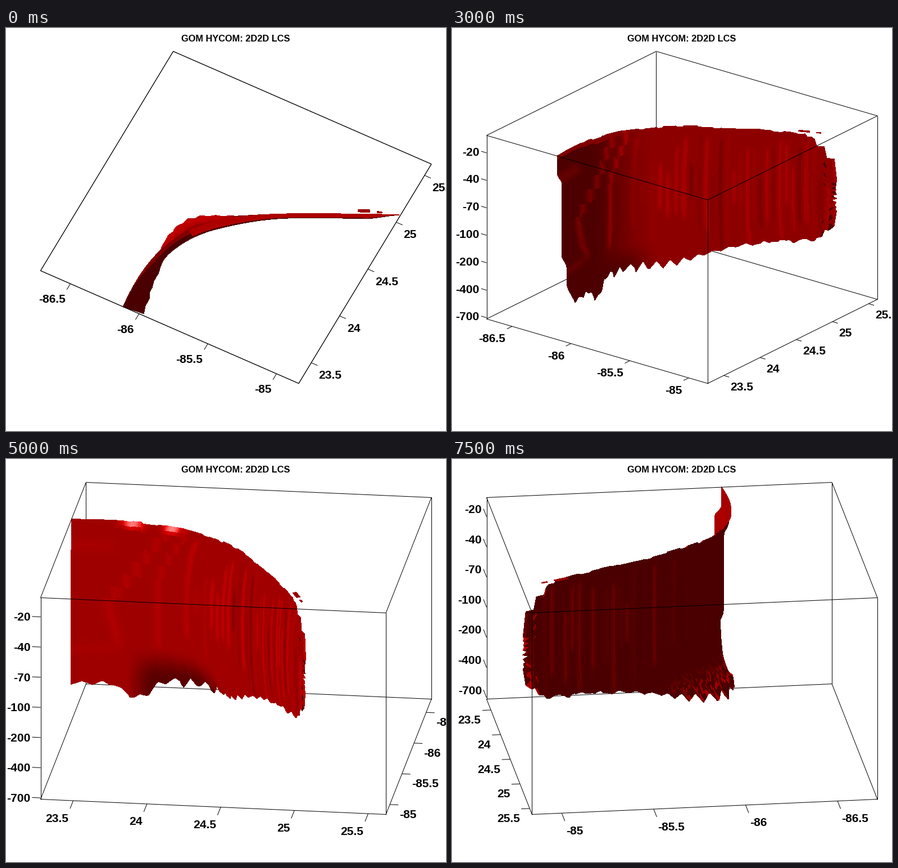
Recreate the animation shown at these times as a matplotlib script. Size 783x716 px, loop 8 s.

```python
import numpy as np
import matplotlib.pyplot as plt
from matplotlib.animation import FuncAnimation
from matplotlib.collections import LineCollection, PolyCollection

W, H, DPI = 783, 716, 64
PX = 72 / DPI                      # one pixel in points
LEFT, RIGHT, TOP, BOTTOM = 61.5, 757, 41.5, 631.5
plt.rcParams["font.family"] = "Liberation Sans"

X_TICKS = [(.1154 + .2662 * k, f"{-86.5 + k / 2:g}") for k in range(4)]
Y_TICKS = [(.0945 + .2135 * k, f"{23.5 + k / 2:g}") for k in range(5)]
Z_TICKS = [(.905 - .1497 * k, f"{-d}") for k, d in enumerate([20, 40, 70, 100, 200, 400, 700])]

CUBE = np.array([(i, j, k) for i in (0, 1) for j in (0, 1) for k in (0, 1)], float)
EDGES = [(i, j) for i in range(8) for j in range(i + 1, 8)
         if np.abs(CUBE[i] - CUBE[j]).sum() == 1]


def camera(i):
    """Tilt down to 30 degrees first, then orbit in 15 degree steps."""
    el = max(30, 90 - 15 * i)
    az = 22.5 + 15 * max(0, i - 5) + (4.7 if el == 90 else 0)
    return az, el


class View:
    """Orthographic view of the unit cube, stretched to fill the plot area."""

    def __init__(self, az, el):
        a, e = np.radians([az, el])
        ca, sa, ce, se = np.cos(a), np.sin(a), np.cos(e), np.sin(e)
        self.right = np.array([ca, sa, 0])
        self.up = np.array([-se * sa, se * ca, ce])
        self.toward = np.array([ce * sa, -ce * ca, se])
        x, y = CUBE @ self.right, CUBE @ self.up
        self.x0, self.y0 = x.min(), y.min()
        self.kx = (RIGHT - LEFT) / np.ptp(x)
        self.ky = (BOTTOM - TOP) / np.ptp(y)

    def project(self, p):
        p = np.asarray(p, float)
        return np.stack([LEFT + (p @ self.right - self.x0) * self.kx,
                         BOTTOM - (p @ self.up - self.y0) * self.ky], -1)

    def depth(self, p):
        return np.asarray(p, float) @ self.toward


def smooth(x, a, b):
    t = np.clip((x - a) / (b - a), 0, 1)
    return t * t * (3 - 2 * t)


def bump(x, c, w):
    return np.exp(-((x - c) / w) ** 2)


def zigzag(x):
    return np.abs(x % 1 - .5) * 2


def bezier(q, a, b, c, d):
    q, p = q[:, None], 1 - q[:, None]
    return p**3 * a + 3 * p**2 * q * b + 3 * p * q**2 * c + q**3 * d


# ---- the sheet: a curtain hung from a curved rim, q runs along the rim ----
rng = np.random.default_rng(7)
NQ, NR = 181, 48
q = np.linspace(0, 1, NQ)
t = np.linspace(0, 1, NR)[None, :]

rim = bezier(q, *np.array([(.32, 0), (.27, .45), (.492, .515), (.995, .767)]))
along = np.gradient(rim, axis=0)
along /= np.linalg.norm(along, axis=1)[:, None]
inward = np.stack([along[:, 1], -along[:, 0]], -1)

# rounded far end, cut in steps; torn lower edge
step = np.where(q > .78, np.floor(q * 44) / 44, q)
end = np.clip((step - .85) / .15, 0, 1)
ragged = rng.uniform(0, 1, 100)
w_top = 1 - .25 * end**4 - .012 * ragged[(q * 40).astype(int)] * smooth(q, .1, .2)
w_bot = .235 + .185 * smooth(step, .42, .95) - .08 * bump(q, .17, .05) + .17 * end**6
tear = .025 + .04 * smooth(q, .1, .2) * (1 - smooth(q, .5, .65))
w_bot -= tear * (zigzag(q * 20) - .3) * (.3 + .7 * ragged[(q * 20).astype(int) + 50])

w = w_bot[:, None] + (w_top - w_bot)[:, None] * t
col = q[:, None]
leg = 1 - .25 * smooth(w, .86, .9) - .25 * smooth(w, .41, .46) - .5 * smooth(w, .2, .32)
flare = 1 - smooth(w, .18, .42)
mix = smooth(col, .17, .3)
hang = .08 * (1 - smooth(col, 0, .3)) - .045 * bump(col, .4, .13)
belly = .03 * smooth(col, .08, .19) - .013 * smooth(col, .5, .75) - .015 * smooth(col, .93, 1)
shift = hang * (leg * (1 - mix) + flare * mix) + belly * np.sin(np.pi * t) ** .4
serrate = -.022 * zigzag(t * 7.5) * smooth(col, .95, 1)
uv = rim[:, None] + shift[..., None] * inward[:, None] + serrate[..., None] * along[:, None]
MESH = np.concatenate([uv, w[..., None]], -1)

QUADS = np.stack([MESH[:-1, :-1], MESH[1:, :-1], MESH[1:, 1:], MESH[:-1, 1:]], 2).reshape(-1, 4, 3)
CENTRE = QUADS.mean(1)
fq = np.repeat((q[:-1] + q[1:]) / 2, NR - 1)
ft = np.tile((t[0, :-1] + t[0, 1:]) / 2, NQ - 1)
fu, fw = CENTRE[:, 0], CENTRE[:, 2]


def leg_relief():
    """Level bands and two stair-like ridges on the straight part."""
    stair = np.floor(fw * 16) / 16 + .02
    d1 = .085 + .49 * np.clip(stair - .6, 0, 1) + .15 * np.clip(.6 - fw, 0, 1)
    d2 = .24 + .44 * np.clip(stair - .75, 0, 1)
    r = (bump(fq, d1, .015) + bump(fq, d2, .013)) * smooth(fw, .35, .45)
    bands = .6 * bump(fw, .88, .025) + .5 * bump(fw, .385, .025)
    return r + bands * (1 - smooth(fq, .08, .12))


def arm_relief():
    """Upright ribs, one per grid column, each with its own reach."""
    cell = fu / .0213
    k = cell.astype(int)
    amp = rng.choice([-.9, -.4, .3, 1], 60)[k]
    lo, hi = rng.uniform(.3, .6, 60)[k], rng.uniform(.72, 1, 60)[k]
    rib = np.sin(np.pi * (cell % 1)) ** 2
    reach = smooth(fw, lo, lo + .06) * (1 - smooth(fw, hi - .03, hi + .03))
    return amp * rib * reach * smooth(fq, .3, .4)


LEG, ARM = leg_relief(), arm_relief()
UNDER = smooth(fq, .13, .22) * (1 - smooth(fq, .33, .5)) * (1 - smooth(fw, .24, .42))
FLARE = (1 - smooth(fw, .25, .38)) * smooth(fq, .18, .25) * (1 - smooth(fq, .5, .68))
GLINT = (bump(fq, .15, .03) + bump(fq, .28, .03)) * smooth(ft, .95, .99)
SPECKLE = rng.random(len(fq))


def dash(u, v, n):
    """A loose flake lying level beside the rim."""
    a, b = np.array([.018, .008, 0]) * n, np.array([-.003, .004, 0]) * n
    c = np.array([u, v, 1])
    return [c - a - b, c + a - b, c + a + b, c - a + b]


FLAKES = np.array([dash(.88, .725, 1), dash(.93, .745, .4)])


def brightness(az, el, front):
    leg_lit = .29 + .36 * smooth(az, 30, 112)
    arm_lit = .29 + .34 * smooth(az - (el - 30) / 2, 5, 52)
    base = leg_lit + (arm_lit - leg_lit) * smooth(fq, .12, .48)
    lit = (base - .29) / .34
    inner = base + LEG * (.06 * lit + .6 * max(0, arm_lit - leg_lit)) + ARM * (.02 + .1 * lit)
    inner += (.30 - inner) * UNDER * .85
    inner = np.where(ft > .97, np.maximum(inner, .5), inner)
    overhead = smooth(el, 75, 90)
    inner += (.68 - inner) * overhead * ((fq > .38) & (ft > .8))
    inner += GLINT * .5 * bump(az, 97.5, 22)

    outer = .29 + .11 * np.clip(ARM, 0, 1) * smooth(fq, .55, .62)
    outer += FLARE * (.35 * (SPECKLE > .6) * (1 - overhead) + .45 * overhead)
    return np.clip(np.where(front, inner, outer), .27, 1.2)


def to_rgb(v):
    pale = np.clip((v - .85) * 1.8, 0, .7)
    return np.stack([np.clip(v, 0, 1), pale, pale], -1)


# ---- stage ----
fig = plt.figure(figsize=(W / DPI, H / DPI), dpi=DPI, facecolor="white")
ax = fig.add_axes([0, 0, 1, 1])
ax.set_xlim(0, W)
ax.set_ylim(H, 0)
ax.axis("off")


def lines(z):
    return ax.add_collection(LineCollection([], colors="black", linewidths=PX, zorder=z),
                             autolim=False)


def label(txt):
    return ax.text(0, 0, txt, size=21 * PX, weight="bold", va="baseline", zorder=5)


back, front_lines = lines(1), lines(3)
sheet = ax.add_collection(PolyCollection([], linewidths=.5 * PX, antialiaseds=False, zorder=2),
                          autolim=False)
ax.text(409, 24, "GOM HYCOM: 2D2D LCS", size=16.4 * PX, weight="bold", ha="center", va="baseline")
x_text, y_text, z_text = ([label(n) for _, n in ticks] for ticks in (X_TICKS, Y_TICKS, Z_TICKS))


def draw_axes(view, az, el):
    pts = view.project(CUBE)
    far = int(np.argmin(view.depth(CUBE)))
    back.set_segments([pts[list(e)] for e in EDGES if far in e])
    ahead = [pts[list(e)] for e in EDGES if far not in e]

    axes = [view.project(v) - view.project([0, 0, 0]) for v in np.eye(3)]
    length = .0245 * max(np.hypot(*a) for a in axes)

    def tick(p, direction):
        a = view.project(p)
        b = a + direction / np.hypot(*direction) * length
        ahead.append(np.array([a, b]))
        return a, b

    def floor_label(txt, a, b):
        left = b[0] < a[0]
        txt.set_ha("right" if left else "left")
        txt.set_position((b[0] + (-2.5 if left else 2), b[1] + 23.5))

    side = 0 if az < 90 else 1
    for (u, _), txt in zip(X_TICKS, x_text):
        floor_label(txt, *tick([u, side, 0], axes[1] * (2 * side - 1)))
    for (v, _), txt in zip(Y_TICKS, y_text):
        floor_label(txt, *tick([1, v, 0], axes[0]))
    for (z, _), txt in zip(Z_TICKS, z_text):
        txt.set_visible(el < 90)
        if el < 90:
            _, b = tick([side, 0, z], -axes[side])
            txt.set_ha("right")
            txt.set_position((b[0] - 3, b[1] + 7.5))
    front_lines.set_segments(ahead)


def draw(i):
    az, el = camera(i)
    view = View(az, el)
    draw_axes(view, az, el)
    p = view.project(QUADS)
    dq = p[:, 1] + p[:, 2] - p[:, 0] - p[:, 3]
    dw = p[:, 2] + p[:, 3] - p[:, 0] - p[:, 1]
    front = dq[:, 1] * dw[:, 0] > dq[:, 0] * dw[:, 1]
    value = np.append(brightness(az, el, front), [.6] * len(FLAKES))
    polys = np.concatenate([p, view.project(FLAKES)])
    order = np.argsort(view.depth(np.concatenate([CENTRE, FLAKES.mean(1)])))
    rgb = to_rgb(value[order])
    sheet.set_verts(polys[order])
    sheet.set_facecolor(rgb)
    sheet.set_edgecolor(rgb)
    return []


anim = FuncAnimation(fig, draw, frames=16, interval=500, init_func=lambda: draw(0),
                     repeat=True, repeat_delay=0, blit=False)
plt.show()
```
